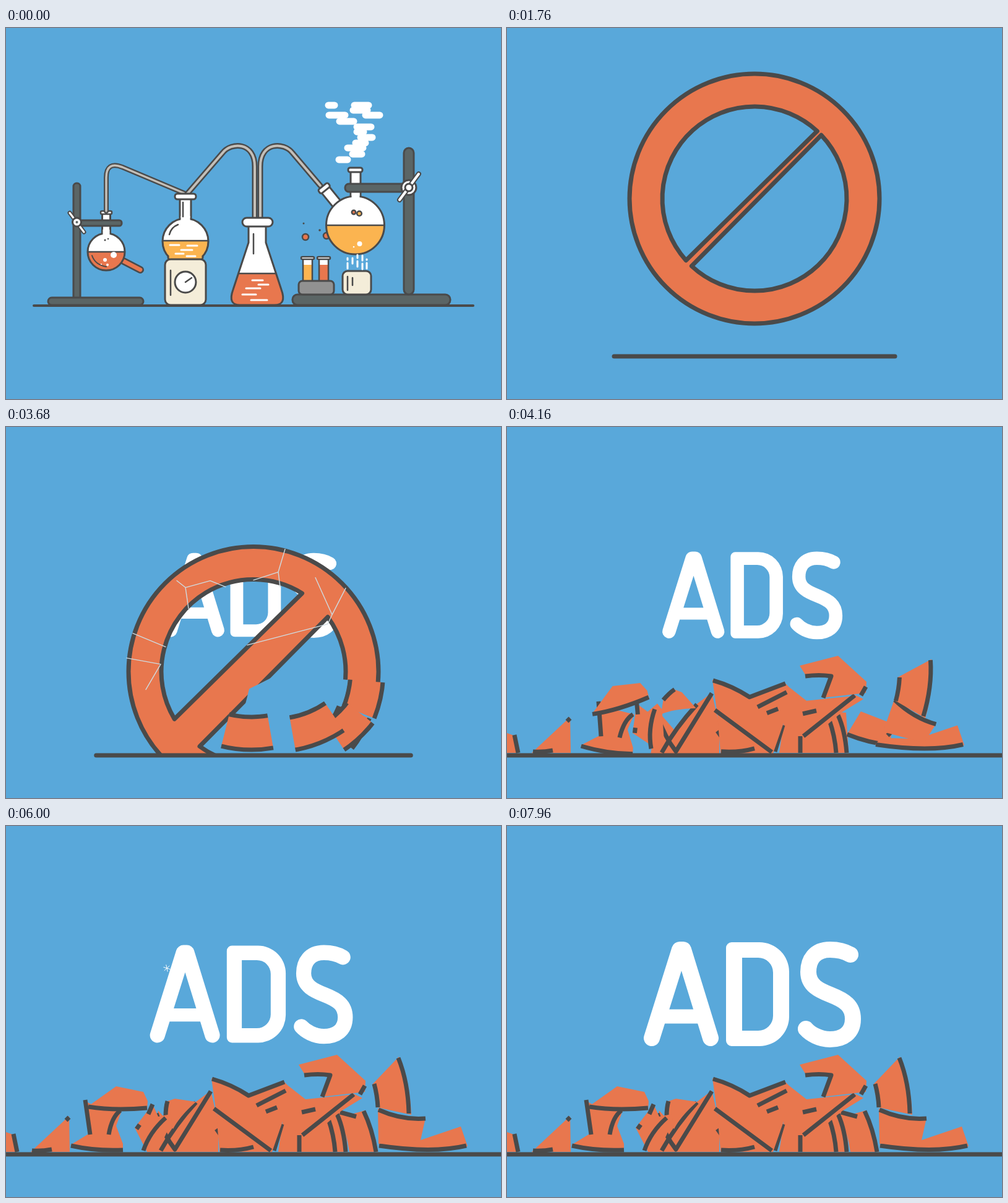
These frames come from a looping animation (800 by 600 pixels, 8000 ms). An HTML page with a canvas:

```html
<!DOCTYPE html>
<html lang="en">
<head>
<meta charset="utf-8">
<title>Sign</title>
<style>
html, body { margin: 0; width: 100%; height: 100%; overflow: hidden; background: #59a8da; }
canvas { display: block; width: 800px; height: 600px; }
</style>
</head>
<body>
<canvas id="stage" width="800" height="600" role="img" aria-label="ADS"></canvas>
<script>
const c = document.getElementById('stage').getContext('2d');
const LOOP = 8000, TAU = Math.PI * 2, CX = 400, CY = 276, R = 202, INNER = 149, FLOOR = 531;
const SKY = '#59a8da', INK = '#4a4a4a', ORANGE = '#e8774e', YELLOW = '#fbb450',
      WHITE = '#fff', CREAM = '#f4edd9', STEEL = '#5b6565', TUBE = '#c4bfb8';

const rad = deg => deg * Math.PI / 180;
const ramp = (t, a, b) => Math.min(1, Math.max(0, (t - a) / (b - a)));
const easeOut = u => 1 - (1 - u) ** 3;
const smooth = u => u * u * (3 - 2 * u);
const backOut = u => 1 + 2.7 * (u - 1) ** 3 + 1.7 * (u - 1) ** 2;
function keys(t, points) {
  const i = points.findIndex(p => p[0] >= t);
  if (i < 0) return points[points.length - 1][1];
  if (i === 0) return points[0][1];
  const [a, b] = [points[i - 1], points[i]];
  return a[1] + (b[1] - a[1]) * ramp(t, a[0], b[0]);
}
function layer(draw) { c.save(); draw(); c.restore(); }

function shape(path, fill, width = 3) {
  if (fill) { c.fillStyle = fill; c.fill(path); }
  if (width) { c.lineWidth = width; c.strokeStyle = INK; c.stroke(path); }
}
function stroke(d, color, width) {
  c.strokeStyle = color; c.lineWidth = width; c.stroke(new Path2D(d));
}
function box(x, y, w, h, r, fill, width) {
  const p = new Path2D();
  p.roundRect(x, y, w, h, r);
  shape(p, fill, width);
}
function globe(x, y, r) {
  const p = new Path2D();
  p.arc(x, y, r, 0, TAU);
  return p;
}
function dot(x, y, r, fill, width = 0) {
  shape(globe(x, y, r), fill, width);
}
function pipe(d, color, outer, inner) {
  stroke(d, INK, outer);
  stroke(d, color, inner);
}
function vessel(path, level, liquid) {
  shape(path, WHITE, 0);
  layer(() => {
    c.clip(path);
    c.fillStyle = liquid;
    c.fillRect(0, level, 800, 200);
    stroke(`M0 ${level}H800`, INK, 2.5);
  });
  shape(path, null, 3);
}
function arc(r, from, to) {
  c.beginPath();
  c.arc(CX, CY, r, rad(from), rad(to));
  c.strokeStyle = INK; c.lineWidth = 7; c.stroke();
}

// Laboratory
const SMOKE = [[521, 531, 125], [563, 586, 125], [561, 584, 133], [522, 548, 141], [581, 604, 141],
  [539, 562, 151], [567, 590, 160], [567, 578, 168], [573, 592, 177], [565, 581, 186],
  [552, 577, 194], [560, 575, 204], [538, 552, 213]];

function leftBench() {
  box(109, 251, 11, 190, 5, STEEL);
  box(68, 436, 154, 12, 6, STEEL);
  pipe('M190 377L217 391', ORANGE, 12, 6.5);
  box(155.5, 300, 13, 36, 0, WHITE);
  vessel(globe(162, 362, 30), 362, ORANGE);
  box(156.5, 326, 11, 9, 0, WHITE, 0);
  box(153, 296, 18, 5, 2, WHITE, 2.5);
  box(112, 311, 75, 9, 4, STEEL);
  pipe('M103 299L126 330', WHITE, 7, 3);
  dot(114.5, 314, 7, WHITE, 3);
  dot(114.5, 314, 2, STEEL);
  stroke('M139 368Q144 383 162 386', INK, 2);
  [[174, 367, 5], [160, 375, 3], [164, 383, 2], [154, 382, 1]].forEach(b => dot(...b, WHITE));
  dot(160, 343, 1.5, INK); dot(165, 341, 1.2, INK);
}
function middleBench() {
  box(262, 366, 56, 9, 4, YELLOW);
  box(281, 274, 18, 40, 0, WHITE);
  vessel(globe(290, 345, 37), 344, YELLOW);
  box(282.5, 304, 15, 10, 0, WHITE, 0);
  box(263.5, 368, 53, 5, 2, YELLOW, 0);
  stroke('M264 334Q267 322 278 318M286 282V305', INK, 2.5);
  stroke('M265 351H280M293 352H309M283 359H301M274 365H287M292 369H306', WHITE, 3);
  box(273, 268, 34, 9, 4, WHITE);
  box(257, 374, 66, 74, 9, CREAM);
  dot(290, 411, 17, WHITE, 3);
  stroke('M290 411L300 404M266 392V432', INK, 2.5);
  vessel(new Path2D('M392 320V347L367 423Q358 448 378 448H434Q454 448 445 423L420 347V320Z'), 397, ORANGE);
  stroke('M400 333V365', INK, 2.5);
  stroke('M398 408H415M408 415H424M388 421H411M382 431H404M396 440H422', WHITE, 3);
  box(382, 307, 49, 14, 7, WHITE);
}
function rightBench(t) {
  const wobble = Math.sin(t / 120) * 3;
  box(463, 431, 255, 17, 8, STEEL);
  box(643, 194, 16, 237, 8, STEEL);
  dot(518, 336 + wobble, 5, ORANGE, 2.5);
  dot(484, 338 - wobble, 5, ORANGE, 2.5);
  dot(481, 316, 1.5, INK); dot(507, 327, 1.8, INK);
  [[480, YELLOW], [506, ORANGE]].forEach(([x, color]) => {
    box(x, 373, 15, 42, 0, WHITE, 0);
    box(x, 383, 15, 32, 0, color, 0);
    box(x, 373, 15, 42, 0, null, 2.5);
    box(x - 3, 370, 21, 4, 2, WHITE, 2.5);
  });
  box(473, 409, 57, 22, 6, '#919191');
  layer(() => {
    c.translate(523, 270); c.rotate(rad(-39));
    box(-8, -14, 16, 46, 0, WHITE);
    box(-10, -18, 20, 8, 3, WHITE);
  });
  box(557, 232, 16, 46, 0, WHITE);
  vessel(globe(564.5, 319, 47), 319, YELLOW);
  box(558.5, 266, 13, 14, 0, WHITE, 0);
  box(553, 226, 23, 7, 3, WHITE);
  box(548, 252, 98, 13, 6, STEEL);
  dot(562, 298, 3.2, ORANGE, 2.5); dot(571, 300, 3.8, YELLOW, 2.5);
  dot(571.5, 349, 4, WHITE); dot(562, 354, 1.3, WHITE);
  dot(651, 258, 12, WHITE, 3);
  pipe('M667 236L636 278', WHITE, 8, 4);
  dot(651, 258, 6, WHITE, 3);
  box(544, 393, 46, 38, 8, CREAM);
  stroke('M552 402V424M560 404V416', INK, 2.5);
  c.setLineDash([9, 5]);
  c.lineDashOffset = t / 20;
  stroke('M552 389V372M560 381V370M568 386V367M576 390V368M583 389V374', WHITE, 3);
  c.setLineDash([]);
  SMOKE.forEach(([a, b, y], i) => {
    const sway = Math.sin(t / 150 + i) - Math.sin(i);
    stroke(`M${a + sway * 4} ${y - t * .09}H${b + sway * 4}`, WHITE, 11);
  });
}
function lab(t) {
  const size = 1 - ramp(t, 420, 720) ** 2;
  if (size <= 0) return;
  layer(() => {
    c.translate(400, 449 - 120 * (1 - size)); c.scale(size, size); c.translate(-400, -449);
    stroke('M45 449H755', INK, 4);
    leftBench();
    pipe('M162 296V242Q162 215 188 225L290 268', TUBE, 8, 3.5);
    pipe('M293 268L350 202C364 184 402 184 402 224V308', TUBE, 9, 4);
    pipe('M411 308V224C411 184 449 184 463 202L508 255', TUBE, 9, 4);
    middleBench();
    rightBench(t);
  });
}

// Lettering, drawn at its final size
const LETTER_A = 'M234 343L279 200H285L329 343', BAR_A = 'M250 308H315';
const LETTER_S = 'M555 208C543 201 532 200 522 200C497 200 487 217 487 236C487 258 505 266 523 273'
  + 'C546 282 559 291 559 312C559 335 543 345 522 345C505 345 490 336 483 328';
function lettering(t) {
  if (t < 2050) return;
  const size = keys(t, [[3650, .8], [4800, .866], [6000, .934], [6720, .973], [7500, .995], [7960, 1]])
    * backOut(ramp(t, 2050, 2400));
  layer(() => {
    c.translate(397, 272); c.scale(size, size); c.translate(-397, -272);
    stroke(LETTER_A, WHITE, 26);
    stroke(BAR_A, WHITE, 23);
    stroke(LETTER_S, WHITE, 26);
    c.beginPath();
    c.roundRect(354, 188, 102, 168, [9, 48, 48, 9]);
    c.roundRect(380, 213, 50, 118, [0, 24, 24, 0]);
    c.fillStyle = WHITE;
    c.fill('evenodd');
  });
}

// Prohibition sign
function sign(outer, inner, bar, outline) {
  const rim = globe(CX, CY, outer);
  const holes = new Path2D();
  if (bar === 0) holes.arc(CX, CY, inner, 0, TAU);
  else [[-134.6, .235], [44.7, .156]].forEach(([mid, depth]) => {
    const half = Math.acos(depth * bar), a = rad(mid);
    holes.moveTo(CX + inner * Math.cos(a - half), CY + inner * Math.sin(a - half));
    holes.arc(CX, CY, inner, a - half, a + half);
    holes.closePath();
  });
  const body = new Path2D(rim);
  body.addPath(holes);
  c.fillStyle = ORANGE;
  c.fill(body, 'evenodd');
  if (outline) { shape(rim, null, 7); shape(holes, null, 7); }
}
function buildSign(t) {
  const disc = keys(t, [[700, 0], [800, 85], [960, 165], [1100, 194], [1240, R]]);
  if (disc <= 0) return;
  const hole = 13 + (INNER - 13) * smooth(ramp(t, 960, 1400)) - 13 * (1 - ramp(t, 900, 960));
  const bar = easeOut(ramp(t, 1740, 2050));
  sign(disc, hole, bar, t >= 1740);
  if (t >= 1740) return;
  const spin = (t - 960) * .25;
  const sweep = keys(t, [[720, 0], [960, 337], [1060, 360]]);
  const begin = -99 + (t - 960) * .15;
  if (sweep > 0) arc(R, begin, begin + sweep);
  const tail = 1 - ramp(t, 960, 1200);
  if (t > 840 && tail > 0) {
    arc(214, 117 + spin, 117 + spin + 32.6 * tail);
    arc(138, 94 + spin, 94 + spin + 16 * tail);
  }
  if (t > 860) arc(INNER, 97 + spin, 97 + spin + keys(t, [[860, 1], [960, 30], [1400, 360]]));
}

const CRACKS = 'M276 129L290 140L330 129L355 139M290 140L295 174M400 128L440 115L451 78M440 115L443 139'
  + 'M549 141L527 184L520 199L390 233M500 124L527 184M205 214L258 236M195 254L250 264L226 305';
const BROKEN_BAR = 'M255 350L470 140L540 190L433 284L345 328L340 385L300 425Z';
const CUTS = [5, 22, 38, 56, 80, 104];

function breakSign(t) {
  const fall = 4.67e-4 * Math.max(0, t - 3175) ** 2;
  if (fall < 2) return sign(R, INNER, 1, true);
  layer(() => {
    c.beginPath(); c.rect(0, 0, 800, FLOOR - 3); c.clip();
    layer(() => {
      c.translate(0, fall);
      const upper = new Path2D(BROKEN_BAR);
      upper.moveTo(CX, CY);
      upper.arc(CX, CY, 260, rad(104), rad(365));
      upper.closePath();
      c.clip(upper);
      sign(R, INNER, 1, true);
      c.globalAlpha = ramp(t, 3200, 3600);
      stroke(CRACKS, '#cfdbe0', 1.4);
    });
    // Lower pieces rest on the floor and slide outwards
    CUTS.slice(1).forEach((to, i) => {
      const from = CUTS[i], mid = rad((from + to) / 2);
      const low = to > 90 ? 1 : Math.sin(rad(to));
      const dy = Math.min(fall, 522 - CY - R * low);
      const slide = Math.min(90, 1.2 * (fall - dy)) + (i === 0 ? 8 * ramp(fall, 0, 119) : 0);
      layer(() => {
        c.translate(Math.cos(mid) * slide, dy);
        c.beginPath();
        c.arc(CX, CY, 207, rad(from), rad(to));
        c.arc(CX, CY, 145, rad(to), rad(from), true);
        c.clip();
        sign(R, INNER, 1, true);
      });
    });
  });
}
function crumbs(t) {
  if (t < 2880 || t > 3400) return;
  const drop = (t - 3000) * .04 + Math.max(0, t - 3000) ** 2 * .0005;
  [[487, 227], [493, 230], [491, 236], [509, 222]].forEach(([x, y]) => dot(x, y + drop, 3, ORANGE));
}

// Rubble: fill, edge lines, and an optional early pose [dx, dy, degrees, pivot x, pivot y]
const RUBBLE = [
  ['M0 495L14 500L19 527H0Z', 'M12 498L18 527'],
  ['M40 527L102 469L103 527Z', 'M42 525Q58 526 74 523M97 476L102 471'],
  ['M126 444L142 452L187 460L178 485L189 514V527Q140 528 104 516L135 497Z',
    'M128 443L136 499M105 517Q145 526 189 524M185 460Q171 470 166 499', [14, 2, 4, 150, 527]],
  ['M246 460L272 490L307 446L331 428L343 480V527H232Z',
    'M243 465Q255 500 273 523L331 429M250 525Q272 485 307 447M340 490L350 504'],
  ['M258 470L261 445L273 441L307 446Q280 470 270 490Z', 'M261 445Q258 455 258 470', [-2, -14, 40, 276, 458]],
  ['M208 488L237 450L246 470L266 466L268 478L245 527H228Z',
    'M237 450L230 466M211 490L216 483M222 525Q232 495 258 472', [-3, -11, -29, 241, 501]],
  ['M133 453L178 421L222 430L229 445L228 459Q180 464 133 453Z', 'M133 454Q175 461 228 456', [-1, -5, -18, 181, 442]],
  ['M440 527L447 478L475 485L520 460L548 462L552 527Z',
    'M446 482L433 525M474 500V527M521 474Q530 500 532 527M535 466Q546 490 549 527'],
  ['M545 470L580 460Q594 490 601 527H555Z', 'M578 461Q592 490 598 527M540 463L566 470', [17, -3, 121, 573, 495]],
  ['M332 408L392 438L449 413L456 420L484 442L562 434L478 500L447 478L430 527H345L340 465Z',
    'M333 409Q365 418 392 436L450 414M336 457L428 525M405 452L452 428M420 462L438 455M346 524Q375 526 400 519M478 463L500 458'],
  ['M478 500L562 433L576 440L540 462L500 497Z', 'M479 500L562 434'],
  ['M473 386L535 370L581 412L580 430L510 438L524 405L483 402Z', 'M482 403Q505 400 524 403L511 438M572 434L580 420'],
  ['M612 506L670 508L735 486L746 518Q690 530 602 517Z', 'M603 517Q690 530 744 517', [-7, -4, 0, 670, 500]],
  ['M601 457Q640 475 678 472L670 508L602 514Z', 'M602 459Q640 476 678 473', [20, -5, 20, 640, 466]],
  ['M592 418L635 373Q653 415 655 467L600 455Z', 'M634 375Q650 415 651 465M595 417Q600 435 601 455', [37, -3, 18, 625, 420]]
].map(([fill, edge, pose = [0, 0, 0, 0, 0]]) => ({ fill: new Path2D(fill), edge, pose }));

function rubble(t) {
  const early = 1 - smooth(ramp(t, 4800, 5900));
  layer(() => {
    c.beginPath(); c.rect(0, 0, 800, FLOOR - 2); c.clip();
    c.lineCap = 'butt';
    RUBBLE.forEach(({ fill, edge, pose: [dx, dy, turn, px, py] }, i) => layer(() => {
      const delay = i * 47 % 150;
      const sunk = 1 - easeOut(ramp(t, 3720 + delay, 4100 + delay));
      c.translate(px + dx * early, py + dy * early + 175 * sunk);
      c.rotate(rad(turn * early));
      c.translate(-px, -py);
      shape(fill, ORANGE, 0);
      stroke(edge, INK, 7);
    }));
  });
}
function sparkle(t) {
  const size = Math.sin(Math.PI * ramp(t, 5900, 6260)) * 7;
  if (size <= 0) return;
  let d = '';
  for (let i = 0; i < 6; i++) {
    const a = i * TAU / 6 + .3;
    d += `M260 230L${260 + size * Math.cos(a)} ${230 + size * Math.sin(a)}`;
  }
  stroke(d, WHITE, 1);
}
function floorLine(t) {
  const half = keys(t, [[700, 0], [820, 85], [960, 148.5], [1120, 196], [1300, 220], [1480, 227],
    [3400, 227], [3680, 254], [3900, 320], [4150, 410]]);
  if (half > 0) stroke(`M${400 - half} ${FLOOR}H${400 + half}`, INK, 7);
}

function render(t) {
  c.fillStyle = SKY;
  c.fillRect(0, 0, 800, 600);
  c.lineCap = c.lineJoin = 'round';
  lab(t);
  lettering(t);
  if (t > 3720) rubble(t);
  if (t < 3175) buildSign(t);
  else if (t < 4120) breakSign(t);
  crumbs(t);
  floorLine(t);
  sparkle(t);
}
const start = performance.now();
function tick() {
  render((performance.now() - start) % LOOP);
  requestAnimationFrame(tick);
}
tick();
</script>
</body>
</html>
```
